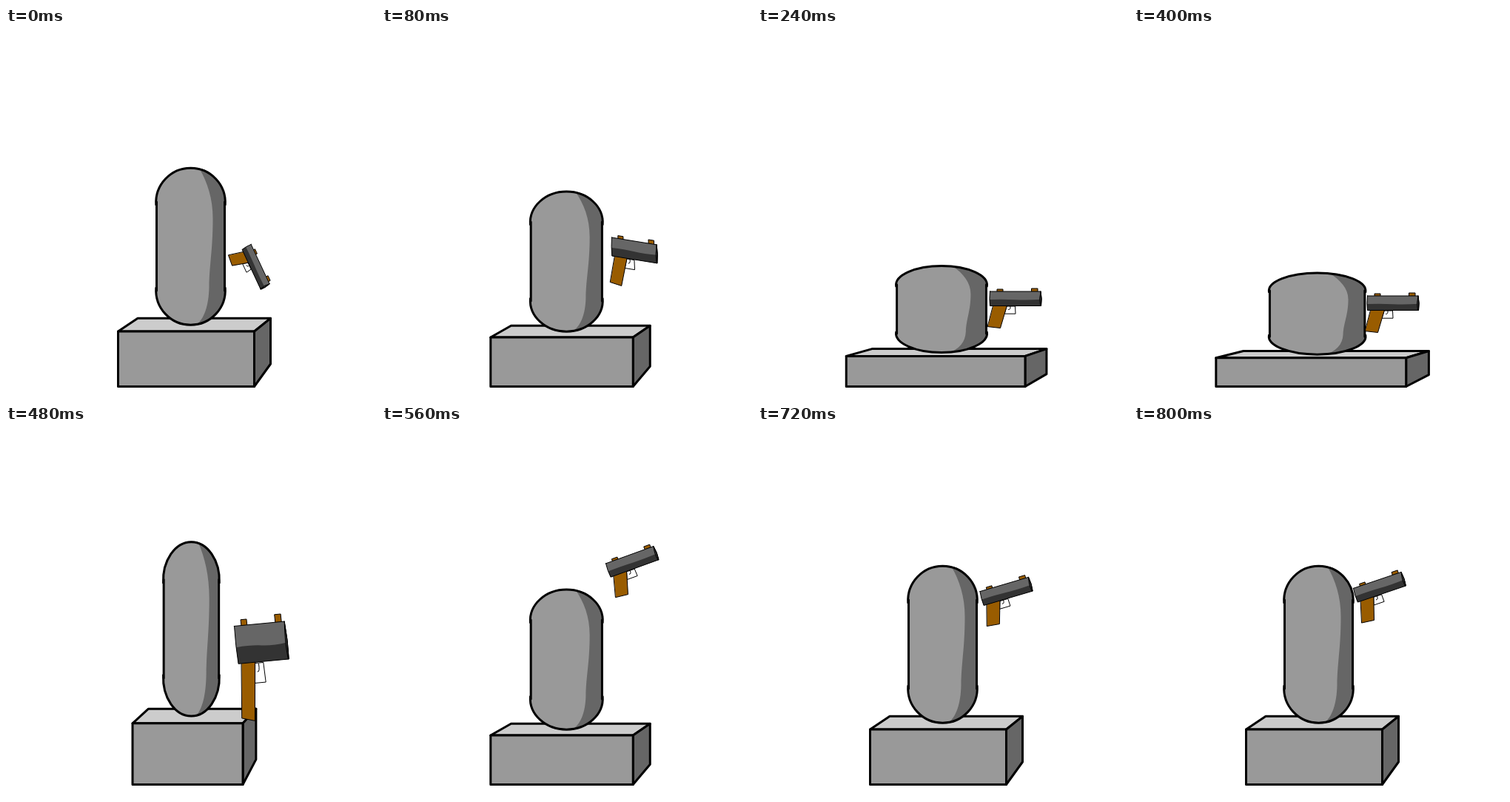
An HTML page for the animation above (1280 ms loop, 500x500 px).

```html
<!DOCTYPE html>
<html lang="en">
<head>
<meta charset="utf-8">
<title>Statue and pistol</title>
<style>
  html, body { margin: 0; width: 100%; height: 100%; overflow: hidden; background: #fff; }
  svg { display: block; width: 100%; height: 100%; }
  path { vector-effect: non-scaling-stroke; stroke-linejoin: round; stroke-linecap: round; }
  #statue path { stroke: #000; stroke-width: 3; }
  #gun path { stroke: #000; stroke-width: 1; }
  #statue .flat, #gun .flat { stroke: none; }
  .mid { fill: #999; }
  .light { fill: #ccc; }
  .dark { fill: #666; }
  .deep { fill: #333; }
  .wood { fill: #995c00; }
  .white { fill: #fff; }
  .line { fill: none; }
</style>
</head>
<body>
<svg viewBox="0 0 500 500">
  <g id="statue">
    <path class="light" d="M151.5 410L178 392.3H357.5L335.5 410Z"/>
    <path class="dark" d="M335.5 410L357.5 392.3V454L335.5 484.5Z"/>
    <path class="mid" d="M151.5 410H335.5V484.5H151.5Z"/>
    <path class="mid flat" d="M203 235A46.5 47 0 0 1 296 235V355A46.5 47 0 0 1 203 355Z"/>
    <path class="dark flat" d="M261 189.5C272 208 279.5 230 279.5 258C279.5 300 275 318 274.5 350C274 375 268 394 256 402C281 398 296 378 296 355V235C296 212 281 193 261 189.5Z"/>
    <path class="line" d="M203.5 235V355M295.5 235V355"/>
    <path class="line" d="M202.8 239A46.8 46.8 0 1 1 296.2 239"/>
    <path class="line" d="M202.8 351.3A46.8 46.8 0 1 0 296.2 351.3"/>
  </g>
  <g id="gun">
    <path class="white" d="M23.5 20H34.5L35 30.2H20.5Z"/>
    <path class="line" d="M28 20.5Q28.5 25 25.5 24.5"/>
    <path class="wood" d="M10 0V-3H18V0ZM56.5 0V-4H65V0Z"/>
    <path class="wood" d="M5 19H23.5L14.5 49.5L-2.5 47.6Z"/>
    <path class="dark flat" d="M0.5 0H69Q71 10 69.5 19.5H0.5Q-0.7 10 0.5 0Z"/>
    <path class="deep flat" d="M0 11Q20 10.4 35 11.2T70 10.8L69.5 19.5H0.5Z"/>
    <path class="deep" d="M69 0Q66.5 10 68.5 19.5H69.5Q71 10 69 0Z"/>
    <path class="line" d="M0.5 0H69Q71 10 69.5 19.5H0.5Q-0.7 10 0.5 0Z"/>
  </g>
</svg>
<script>
const LOOP = 1280, STEP = 80;
const PIVOT = { x: 254.2, y: 484.5 };

const mix = (p, q) => p.map((v, i) => (v + q[i]) / 2);

// Statue scale: [x, y]
const rest = [1, 1], dip = [1.046, 0.892], low = [1.314, 0.552],
      flat = [1.396, 0.52], tall = [0.81, 1.11];

// Pistol matrix: [a, b, c, d, e, f]
const hang = [0.364, 0.78, -0.62, 0.36, 331, 292],
      swing = [0.886, 0.143, 0.017, 1.28, 310, 283],
      level = [1, 0, 0, 1, 313, 356],
      press = [1, 0, 0, 1, 315, 362],
      stretch = [0.988, -0.093, 0.285, 2.61, 308, 270.5],
      fling = [0.94, -0.34, 0.34, 0.94, 302, 186],
      fall = [0.971, -0.243, 0.225, 0.975, 303, 228],
      settle = [0.943, -0.32, 0.3, 0.96, 296, 219.5];

const poses = [
  [rest, hang],
  [dip, swing],
  [mix(dip, low), mix(swing, level)],
  [low, level],
  [mix(low, flat), mix(level, press)],
  [flat, press],
  [tall, stretch],
  [dip, fling],
  [rest, fall],
  [rest, mix(fall, settle)],
  [rest, settle]
];

const statue = document.getElementById('statue');
const gun = document.getElementById('gun');
const start = performance.now();

function draw(now) {
  const t = Math.max(0, now - start) % LOOP;
  const step = Math.min(Math.floor(t / STEP), poses.length - 1);
  const [[sx, sy], matrix] = poses[step];
  const { x, y } = PIVOT;
  statue.setAttribute('transform', `matrix(${sx} 0 0 ${sy} ${x * (1 - sx)} ${y * (1 - sy)})`);
  gun.setAttribute('transform', `matrix(${matrix.join(' ')})`);
  requestAnimationFrame(draw);
}
draw(start);
</script>
</body>
</html>
```
